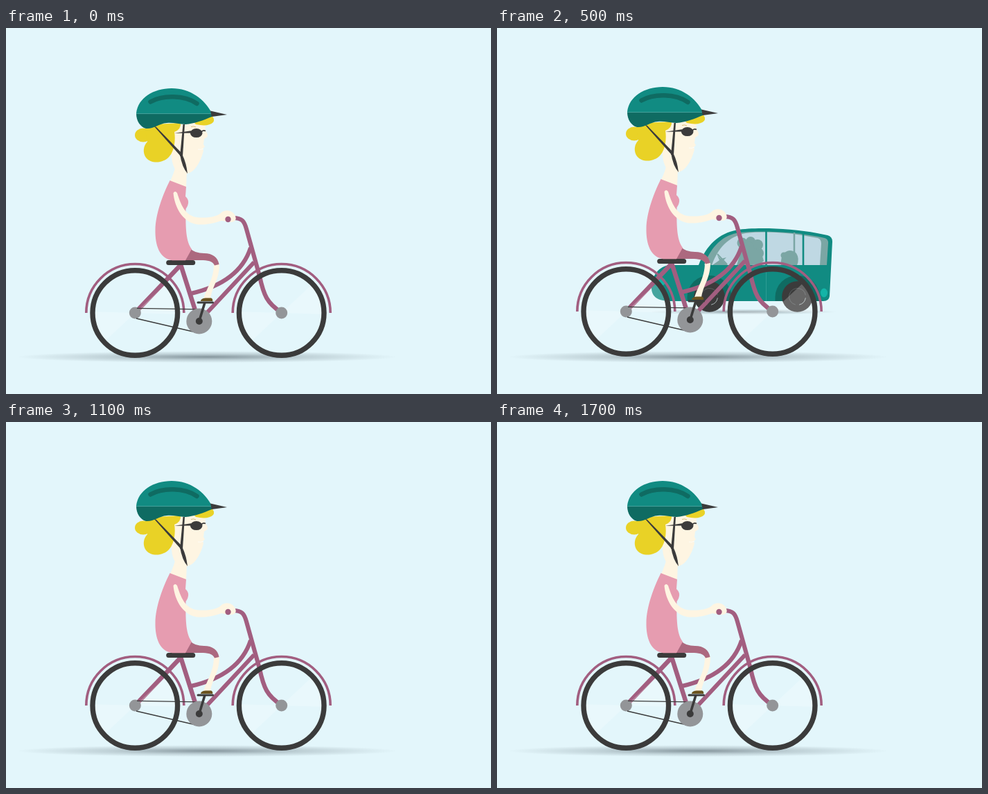
Write an HTML page with a canvas that moves like this. It is 700 by 528 pixels and loops after 1.8 s.

```html
<!DOCTYPE html>
<html lang="en">
<head>
<meta charset="utf-8">
<title>Cyclist and passing car</title>
<style>
html, body { margin: 0; width: 100%; height: 100%; overflow: hidden; background: #e3f6fb; }
canvas { display: block; }
</style>
</head>
<body>
<canvas id="stage" width="700" height="528"></canvas>
<script>
const ctx = document.getElementById('stage').getContext('2d');
const STEP = 100, STEPS = 18;
const SKY = '#e3f6fb', TEAL = '#118b82', DEEP = '#0f6b62', BRIGHT = '#14b4a7';
const DARK = '#3b3b3b', GREY = '#939598', PLUM = '#a25e80', PINK = '#e69cb0';
const SHORTS = '#ac697f', SKIN = '#fef5e2', HAIR = '#e9d226', SHOE = '#6a5420';
const GLASS = '#bfd8e3', TINT = '#7ba6a4';

function fill(d, color) {
  ctx.fillStyle = color;
  ctx.fill(new Path2D(d));
}

function stroke(d, color, width, cap = 'butt') {
  ctx.strokeStyle = color;
  ctx.lineWidth = width;
  ctx.lineCap = cap;
  ctx.stroke(new Path2D(d));
}

function oval(x, y, rx, ry, color) {
  ctx.beginPath();
  ctx.ellipse(x, y, rx, ry, 0, 0, Math.PI * 2);
  ctx.fillStyle = color;
  ctx.fill();
}

const disc = (x, y, r, color) => oval(x, y, r, r, color);

function arc(x, y, r, from, to, color, width) {
  ctx.beginPath();
  ctx.arc(x, y, r, from, to);
  ctx.strokeStyle = color;
  ctx.lineWidth = width;
  ctx.lineCap = 'butt';
  ctx.stroke();
}

function shadow(x, y, rx, ry, alpha) {
  ctx.save();
  ctx.translate(x, y);
  ctx.scale(rx, ry);
  const g = ctx.createRadialGradient(0, 0, 0, 0, 0, 1);
  g.addColorStop(0, `rgba(85,100,108,${alpha})`);
  g.addColorStop(0.5, `rgba(85,100,108,${alpha * 0.4})`);
  g.addColorStop(1, 'rgba(85,100,108,0)');
  disc(0, 0, 1, g);
  ctx.restore();
}

function carWheel(x) {
  fill(`M${x - 32} 394V388A32 31 0 0 1 ${x + 32} 388V394Z`, DEEP);
  disc(x, 387.5, 22.3, DARK);
  arc(x, 387.5, 12, 0.15, 1.35, '#a9b5b6', 1);
  arc(x, 387.5, 12, 1.8, 6.1, '#62696a', 0.8);
}

// Car coordinates start at its front bumper.
function drawCar(x) {
  ctx.save();
  ctx.translate(x, 0);
  shadow(131, 409.5, 136, 4, 0.6);
  fill('M29 342H68C79 313 98 296 123 291.5C150 287 201 289 239 296L254 299Q261 301 261 308L257 387Q256 394 248 394H27C10 394 0 388 0 375C0 360 9 342 29 342Z', TEAL);

  const windows = 'M76 342C86 315 103 298 128 295C158 292 207 294 241 301L250 303Q255 304.5 255 310L253 342Z';
  fill(windows, TINT);
  ctx.save();
  ctx.clip(new Path2D(windows));
  fill('M87 342C96 317 111 301 136 296Q180 291 240 303Q245 305 245 311L243 342Z', GLASS);
  ctx.restore();

  disc(131, 310, 7.5, TINT);
  disc(143, 308, 7, TINT);
  disc(153, 313, 8, TINT);
  disc(154, 325, 8, TINT);
  disc(139, 317, 9, TINT);
  fill('M133 312L158 322L162 336Q157 342 140 342H123L127 329Z', TINT);
  fill('M187 342Q186 331 191 325Q200 317 209 325Q214 333 210 342Z', TINT);
  disc(191, 328, 4.5, TINT);
  fill('M88 342L98 335L95 328L100 333L108 331L103 336L110 342Z', TINT);
  stroke('M95 326L109 341', TINT, 2);
  stroke('M206 295V326', TINT, 2.5);
  stroke('M165.5 291V343M219 293V343', TEAL, 2.6);
  stroke('M165.5 342V394', '#35a198', 0.8);
  stroke('M153 350.5H158M172 350.5H178', BRIGHT, 1.2);
  oval(12.5, 366, 8, 6, BRIGHT);
  oval(249, 382, 5, 6.5, BRIGHT);
  carWheel(83.5);
  carWheel(210.5);
  ctx.restore();
}

function bikeWheel(x) {
  const y = 411;
  ctx.fillStyle = 'rgba(255,255,255,0.22)';
  for (const [from, to] of [[-0.75, 0.03], [2.39, 3.17]]) {
    ctx.beginPath();
    ctx.moveTo(x, y);
    ctx.arc(x, y, 60, from, to);
    ctx.fill();
  }
  arc(x, y, 61.3, 0, Math.PI * 2, DARK, 7.4);
  disc(x, y, 8.5, GREY);
}

function drawBike() {
  for (const x of [186.3, 397.7]) arc(x, 411, 70.5, Math.PI, Math.PI * 2, PLUM, 3.6);
  stroke('M190 407L252 342M252 341L273 407', PLUM, 6.5);
  stroke('M288 413L358 338M267 383Q337 367 353 317', PLUM, 6);
  stroke('M328 274C341 274 344 279 347 290L366 358C372 386 377 397 397 410', PLUM, 6.2);
  bikeWheel(186.3);
  bikeWheel(397.7);
  stroke('M189 404.3L279 405.8M188 419L274 439', DARK, 1.3);
  disc(278.8, 423, 18.5, GREY);
  disc(278.8, 423, 5, DARK);
  stroke('M278.8 423L287 396', DARK, 3.6);
  stroke('M277 396H298.5', DARK, 3, 'round');
  stroke('M234.7 338.6H269.7', DARK, 7, 'round');
}

function drawBody() {
  fill('M300 340L308 341C308 363 297 374 295 391H285C289 376 300 363 300 340Z', SKIN);
  fill('M281 394Q281 390 288 389.5L296 389.5Q299 391 298 394Z', SHOE);
  fill('M266 318Q272 325 286 325C298 325 306 331 307.5 341L301 342.5C298 336 291 335 281 335H258Z', SHORTS);
  fill('M245 198Q243 208 237 221L260 230L261 207Z', SKIN);
  fill('M236.5 220L260 229L259 243Q267 250 259.5 261C259 291 260 308 268 319L259 335.2H240C222 333 215 314 215.5 291C216 267 227 239 236.5 220Z', PINK);
  fill('M241.5 238Q244 234 247 238C254 260 261 273 280 273.5C297 274 306 271 311 266C318 260 331 264 331.8 275Q331 280 324 280L311 278C296 283 284 284.5 274 283C254 279 243 257 241.5 238Z', SKIN);
  disc(320.5, 276, 4.2, PLUM);
}

function drawHead() {
  fill('M240 138L287 135L288 148Q292 153 290.5 157L286 160L285 168L287 171L284 174L285 177C282 190 274 207 262 210L246 207C240 198 238 188 239 174Z', SKIN);
  stroke('M277 175Q281 176 285 174', '#fffdf7', 1);
  stroke('M267 142.5Q271 141 274 143', '#d9bf78', 1);
  oval(198, 154.5, 12, 10, HAIR);
  fill('M198 147L213 139L252 137Q253 146 243 150C245 161 243 177 236 185C228 195 210 197 202 187C197 180 198 170 204 164L202 153Z', HAIR);
  fill('M272 137Q285 130 297 127Q302 131 299 136Q292 143 274 139Z', HAIR);

  fill('M243 151.7L267 148.3L267 151.5Z', DARK);
  oval(274.7, 151.6, 8.8, 6.5, DARK);
  stroke('M282 150Q284 146.5 288 148.5', DARK, 1.7);
  fill('M213 141L217 143L254 181L253 186Z', DARK);
  fill('M255.5 139H258L255 185H251Z', DARK);
  fill('M251 182L255 184Q260 194 262 210Q254 201 251 182Z', DARK);

  fill('M188 123C190 101 213 87 239 87C266 87 287 103 297 123Z', TEAL);
  fill('M188 123.5H297V128C285 133 272 138 259 139C249 139 242 136 232 137C220 138 213 146 202 145C194 143 188 134 188 123.5Z', DEEP);
  stroke('M188 123.6H297', '#2f9a91', 0.8);
  stroke('M208.5 106.5C226 96.5 257 96.5 275.5 109', DEEP, 6.5, 'round');
  fill('M295 119.5L319 125L297 128Z', DARK);
}

function drawScene(step) {
  ctx.fillStyle = SKY;
  ctx.fillRect(0, 0, 700, 528);
  shadow(290, 474.5, 275, 8.5, 0.65);
  drawCar(723 - step * 100);
  ctx.save();
  ctx.translate(0, step % 2 ? -2 : 0);
  drawBike();
  drawBody();
  drawHead();
  ctx.restore();
}

const start = performance.now();
function tick() {
  drawScene(Math.floor((performance.now() - start) / STEP) % STEPS);
  requestAnimationFrame(tick);
}
tick();
</script>
</body>
</html>
```
